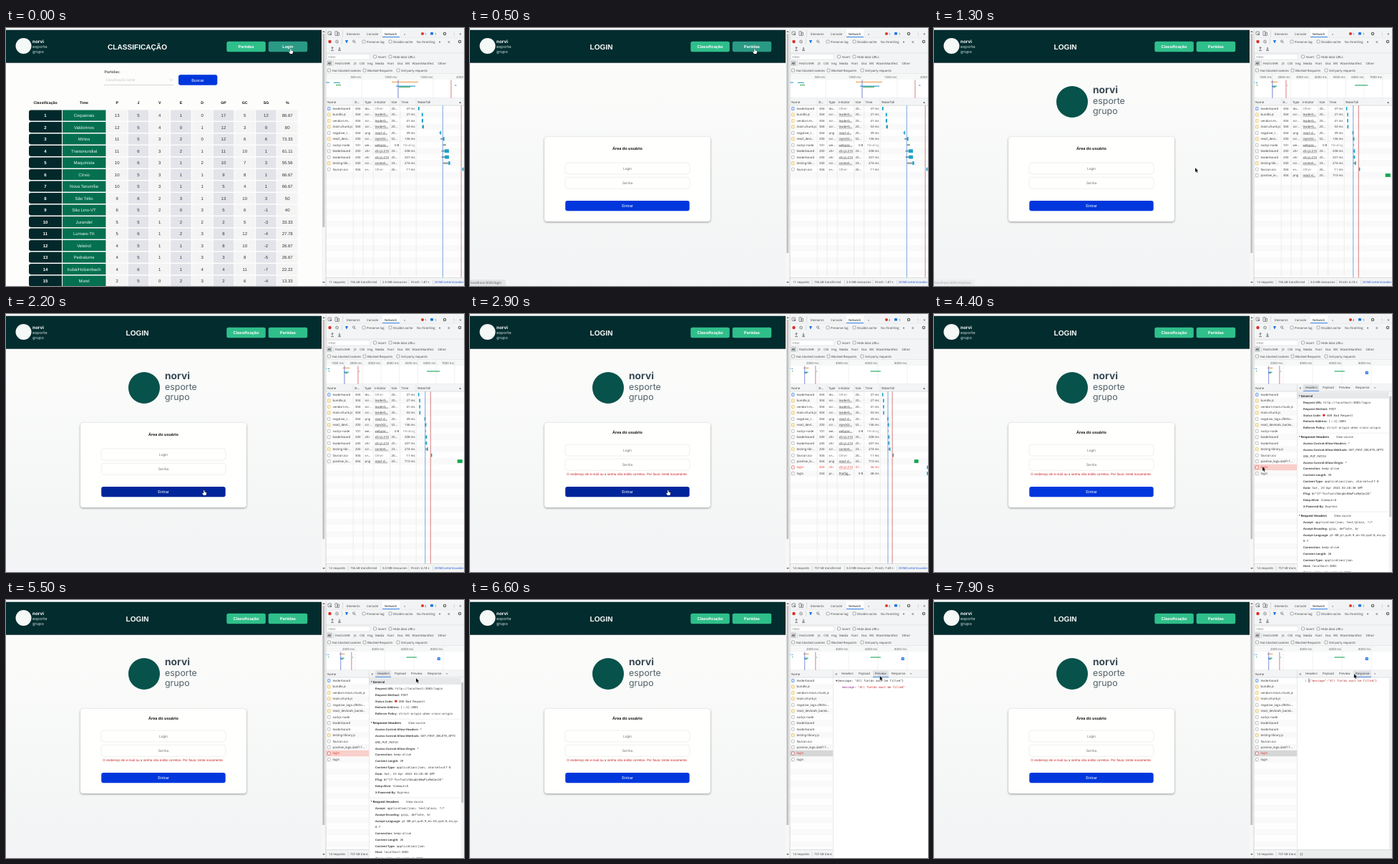
These frames come from a looping animation (640x360 px, 8000 ms). An HTML page with a canvas:

```html
<!DOCTYPE html>
<html lang="pt-BR">
<head>
<meta charset="utf-8">
<title>Login</title>
<style>
html, body { margin: 0; width: 100%; height: 100%; overflow: hidden; background: #fff; }
canvas { display: block; width: 640px; height: 360px; }
</style>
</head>
<body>
<canvas id="stage"></canvas>
<script>
const LOOP = 8000;
const canvas = document.getElementById('stage');
const dpr = window.devicePixelRatio || 1;
canvas.width = 640 * dpr;
canvas.height = 360 * dpr;
const c = canvas.getContext('2d');
c.scale(dpr, dpr);
c.textRendering = 'geometricPrecision';

const SANS = '"Liberation Sans", Arial, sans-serif';
const UI = '"Open Sans", "Noto Sans", sans-serif';
const MONO = '"DejaVu Sans Mono", monospace';
const ROW = 8.46;

// Moments at which the screen switches
const T = { status: 100, page: 400, pending: 600, hint: 700, logo: 1100, badge: 2500,
  error: 2700, open: 4100, preview: 6200, response: 7500 };

// Pointer tip: time, x, y
const PATH = [[0, 398, 29], [1050, 398, 29], [1300, 365, 195], [1700, 277, 246], [3100, 277, 246],
  [3600, 452, 219], [3800, 452, 219], [4000, 459, 213], [4500, 459, 213], [5100, 598, 106],
  [5500, 573, 109], [6000, 574, 103], [6500, 574, 103], [6900, 566, 122], [7250, 570, 118], [7450, 587, 103]];

const TEAMS = `Coqueirais 4 1 0 17 5|Valdorinos 4 0 1 12 3|Mirtos 3 2 0 12 6|Transmundial 3 2 1 11 10
Maquinista 3 1 2 10 7|Círvio 3 1 1 9 8|Nova Tarumília 3 1 1 5 4|São Télio 2 3 1 13 10|São Lino-VT 2 0 3 5 6
Jurandel 1 2 2 2 5|Lumare-TK 1 2 3 8 12|Veleirol 1 1 3 8 10|Pedralume 1 1 3 3 8|Irubá/Holzenbach 1 1 4 4 11
Morel 0 2 3 2 6`.split(/[|\n]/).map(line => {
  const [, name, nums] = line.match(/^(.*?) (\d.*)$/);
  const [v, e, d, gp, gc] = nums.split(' ').map(Number);
  const p = v * 3 + e, j = v + e + d;
  return [name, p, j, v, e, d, gp, gc, gp - gc, +(p / j / 3 * 100).toFixed(2)];
});

// short name, long name, status, type, initiator, size, time, wait start, start, end (ms)
const REQUESTS = `leaderboard;leaderboard;304;do...;Other;20...;37 ms;0;0;55
bundle.js;bundle.js;304;scr...;leaderb...;20...;27 ms;140;150;200
vendors-m...;vendors-main.chunk.js;304;scr...;leaderb...;20...;41 ms;140;150;210
main.chunk.js;main.chunk.js;304;scr...;leaderb...;20...;53 ms;150;175;235
negative_l...;negative_logo.2f805c...;304;png;react-d...;20...;39 ms;860;890;930
react_devt...;react_devtools_backe...;200;scr...;injectGl...;52...;136 ms;910;1000;1070
sockjs-node;sockjs-node;101;we...;webpac...;0 B;Pending;1000;1130;1130
leaderboard;leaderboard;200;xhr;xhr.js:210;20...;208 ms;950;1070;1250
leaderboard;leaderboard;200;xhr;xhr.js:210;20...;207 ms;950;1080;1250
testing-libr...;testing-library.js;200;scr...;content...;23...;274 ms;1020;1230;1300
favicon.ico;favicon.ico;304;x-i...;Other;26...;11 ms;1780;1800;1830
positive_lo...;positive_logo.4a6f17...;304;png;react-d...;20...;710 ms;5490;5490;6200
login;login;400;xhr;xhr.js:210;41...;46 ms;7640;7640;7690
login;login;204;pr...;Preflig...;0 B;48 ms;7640;7640;7690`.split('\n').map(l => l.split(';'));

const HEADERS = `#General
Request URL: http://localhost:3001/login
Request Method: POST
Status Code: @400 Bad Request
Remote Address: [::1]:3001
Referrer Policy: strict-origin-when-cross-origin
#Response Headers
Access-Control-Allow-Headers: *
Access-Control-Allow-Methods: GET,POST,DELETE,OPTI
 ONS,PUT,PATCH
Access-Control-Allow-Origin: *
Connection: keep-alive
Content-Length: 39
Content-Type: application/json; charset=utf-8
Date: Sat, 23 Apr 2022 02:28:30 GMT
ETag: W/"27-TvnfzuCcSbngbi6WwPiwRwGas2A"
Keep-Alive: timeout=5
X-Powered-By: Express
#Request Headers
Accept: application/json, text/plain, */*
Accept-Encoding: gzip, deflate, br
Accept-Language: pt-BR,pt;q=0.9,en-US;q=0.8,en;q=
 0.7
Connection: keep-alive
Content-Length: 26
Content-Type: application/json
Host: localhost:3001
Origin: http://localhost:3000`.split('\n');

function rect(x, y, w, h, fill) {
  c.fillStyle = fill;
  c.fillRect(x, y, w, h);
}
function round(x, y, w, h, r, fill, stroke) {
  c.beginPath();
  c.roundRect(x, y, w, h, r);
  if (fill) { c.fillStyle = fill; c.fill(); }
  if (stroke) { c.strokeStyle = stroke; c.lineWidth = .6; c.stroke(); }
}
function disc(x, y, r, fill) {
  c.beginPath();
  c.arc(x, y, r, 0, 7);
  c.fillStyle = fill;
  c.fill();
}
function line(x1, y1, x2, y2, color, w = .6) {
  c.beginPath();
  c.moveTo(x1, y1);
  c.lineTo(x2, y2);
  c.strokeStyle = color;
  c.lineWidth = w;
  c.stroke();
}
// y is the vertical middle of the line
function text(s, x, y, font, color, align = 'left') {
  c.font = font;
  c.fillStyle = color;
  c.textAlign = align;
  c.fillText(s, x, y + .36 * parseFloat(font.match(/[\d.]+px/)[0]));
}
const sans = (s, x, y, size, color, bold) =>
  text(s, x, y, `${bold ? 'bold ' : ''}${size}px ${SANS}`, color, 'center');
const ui = (s, x, y, color = '#3c3c3c', align) => text(s, x, y, `4.3px ${UI}`, color, align);
const mono = (s, x, y, color = '#333') => text(s, x, y, `4.05px ${MONO}`, color);
function labels(list, y) {
  for (const [s, x, color] of list) ui(s, x, y, color);
}
function check(s, x, y) {
  round(x, y - 2, 4, 4, .8, '#fff', '#777');
  ui(s, x + 6, y);
}

function pointer(t) {
  let i = PATH.findIndex(k => k[0] > t);
  if (i < 0) return PATH[PATH.length - 1].slice(1);
  const [t0, x0, y0] = PATH[i - 1], [t1, x1, y1] = PATH[i];
  const u = (t - t0) / (t1 - t0), e = u * u * (3 - 2 * u);
  return [x0 + (x1 - x0) * e, y0 + (y1 - y0) * e];
}

function drawCursor(x, y, hand) {
  c.save();
  c.translate(x, y);
  c.beginPath();
  const pts = hand
    ? [[-.8, 0], [.3, 0], [.5, 2.4], [3, 3], [3, 5], [2.2, 7], [-1, 7], [-2.8, 4.2], [-2, 3.6], [-.8, 4.5]]
    : [[0, 0], [0, 6], [1.4, 4.8], [2.3, 6.9], [3.3, 6.4], [2.4, 4.4], [4.2, 4.2]];
  pts.forEach(p => c.lineTo(...p));
  c.closePath();
  c.fillStyle = hand ? '#fff' : '#111';
  c.strokeStyle = hand ? '#111' : '#fff';
  c.lineWidth = .6;
  c.stroke();
  c.fill();
  c.restore();
}

function brand(x, y, size, gap, top, rest) {
  text('norvi', x, y, `bold ${size}px Inter, sans-serif`, top);
  text('esporte', x, y + gap, `${size * .9}px Inter, sans-serif`, rest);
  text('grupo', x, y + 2 * gap, `${size * .9}px Inter, sans-serif`, rest);
}

function header(title, buttons, hover) {
  rect(0, 2.7, 441, 46, '#022c2e');
  disc(24.5, 25, 11, '#f4f8f7');
  brand(37, 18.5, 6.3, 7.4, '#fff', '#d5e0df');
  sans(title, 183.5, 26.3, 10.1, '#fff', true);
  buttons.forEach((b, i) => {
    const x = 308.3 + i * 58.4;
    round(x, 18.8, 54.5, 14.4, 2.5, i === 1 && hover ? '#2a9a84' : '#2fbf8a');
    sans(b, x + 27.2, 26, 5.6, '#fff', true);
  });
}

function ranking() {
  rect(0, 48, 441, 312, '#fdfdfc');
  header('CLASSIFICAÇÃO', ['Partidas', 'Login'], true);
  text('Partidas:', 137.5, 61, `bold 5.2px ${SANS}`, '#555');
  text('Classificação Geral', 139, 72.5, `4.8px ${SANS}`, '#c4c4c4');
  line(137, 79.5, 234, 79.5, '#bbb');
  line(229, 71.5, 230.8, 73.3, '#aaa');
  line(230.8, 73.3, 232.6, 71.5, '#aaa');
  round(241, 65.2, 54.3, 14.6, 3, '#0037dc');
  sans('Buscar', 268, 72.5, 5.6, '#fff');
  const colX = i => 155.2 + (i - 1) * 29.75;
  sans('Classificação', 55, 104, 5.2, '#111', true);
  sans('Time', 109, 104, 5.2, '#111', true);
  'P J V E D GP GC SG %'.split(' ').forEach((h, i) => sans(h, colX(i + 1), 104, 5.2, '#111', true));
  TEAMS.forEach((row, n) => {
    const y = 114.5 + n * 16.5, mid = y + 7.4;
    round(32, y, 46, 15, [3, 0, 0, 3], '#03282b');
    sans(n + 1, 55, mid, 6, '#fff', true);
    rect(79, y, 60.5, 15, '#04704f');
    sans(row[0], 109, mid, 6, '#eaf5f0');
    for (let i = 1; i < 10; i++) {
      rect(colX(i) - 14.3, y, 28.6, 15, i % 2 ? '#f4f4f5' : '#e3e4e9');
      sans(row[i], colX(i), mid, 6, '#333');
    }
  });
}

function login(t, px, py) {
  const bg = c.createLinearGradient(0, 49, 0, 360);
  bg.addColorStop(0, '#fbfcfa');
  bg.addColorStop(1, '#f2f4f5');
  rect(0, 48, 441, 312, bg);
  header('LOGIN', ['Classificação', 'Partidas'], py < 34);
  if (t >= T.logo) {
    disc(193, 103, 22, '#07524a');
    brand(222, 86.5, 13.8, 14.6, '#394953', '#52616a');
  }
  c.save();
  c.shadowColor = 'rgba(0,0,0,.4)';
  c.shadowBlur = 3 * dpr;
  c.shadowOffsetY = dpr;
  round(104, 152, 232, 118, 4, '#fffffd');
  c.restore();
  const failed = t >= T.error, up = failed ? 6 : 0;
  sans('Área do usuário', 220, 168.3 - up / 2, 5.5, '#111', true);
  ['Login', 'Senha'].forEach((s, i) => {
    const y = 188 - up + i * 20.2;
    round(133, y, 174, 16, 4, '#fffffe', '#e2e2e0');
    sans(s, 220, y + 8, 5, '#777');
  });
  if (failed) {
    sans('O endereço de e-mail ou a senha não estão corretos. Por favor, tente novamente.',
      219.7, 223.3, 4.66, '#c8202a');
  }
  const over = px > 133 && px < 307 && py > 241 && py < 255;
  round(133.2, 240.9, 173.5, 14.4, 3, over ? '#00259a' : '#0037dc');
  sans('Entrar', 220, 248, 5.7, '#fff');
  return over;
}

function statusBubble(t) {
  const old = t >= T.status && t < T.hint;
  const alpha = old ? 1 : t >= T.hint ? Math.max(0, Math.min(1, (1400 - t) / 200)) : 0;
  if (!alpha) return;
  c.globalAlpha = alpha;
  round(0, 351, old ? 50 : 57, 9, [0, 2, 0, 0], '#e3e5e6');
  text(old ? 'localhost:3000/login' : 'localhost:3000/matches', 1, 355.7, `4.6px ${UI}`, '#555');
  c.globalAlpha = 1;
}

function scrollbar(t) {
  rect(441, 0, 6, 360, '#f7f7f7');
  rect(442.3, 8, 3, t < T.page ? 270 : 306, '#c2c2c2');
  for (const [y, d] of [[6, -2], [354, 2]]) {
    c.beginPath();
    c.moveTo(442, y);
    c.lineTo(446, y);
    c.lineTo(444, y + d);
    c.fillStyle = '#666';
    c.fill();
  }
}

function toolbars(t) {
  rect(447, 2, 193, 11, '#f1f3f4');
  rect(526, 2, 24, 11, '#fff');
  round(450, 5, 4.5, 4.5, .5, null, '#555');
  line(452, 7, 455, 10, '#555', .9);
  round(460, 4.5, 2.8, 6, .5, null, '#555');
  round(463.5, 6, 2, 4.5, .4, null, '#555');
  line(470.5, 3, 470.5, 12, '#ccc');
  labels([['Elements', 476], ['Console', 504], ['Network', 529, '#111'], ['»', 556]], 8);
  rect(526, 12, 24, 1, '#1a73e8');
  disc(582, 8, 2, '#e0332b');
  ui(t < T.badge ? '1' : '2', 585, 8, '#333');
  round(593, 6, 4, 3.5, .6, '#1a73e8');
  ui('1', 599, 8, '#333');
  ui('⋮', 624, 8);
  ui('✕', 633, 8);
  gear(613, 8);
  line(447, 13.3, 640, 13.3, '#d0d0d0');

  rect(447, 13.6, 193, 50.4, '#f3f4f5');
  disc(452.5, 19, 2.2, '#d93025');
  c.beginPath();
  c.arc(462.5, 19, 2, 0, 7);
  c.strokeStyle = '#666';
  c.stroke();
  line(461, 17.6, 464, 20.4, '#666');
  line(469.5, 15, 469.5, 23, '#ccc');
  c.beginPath();
  c.moveTo(474, 17);
  c.lineTo(478, 17);
  c.lineTo(476.4, 21);
  c.lineTo(475.6, 21);
  c.fillStyle = '#1a73e8';
  c.fill();
  c.beginPath();
  c.arc(486, 18.4, 1.5, 0, 7);
  c.strokeStyle = '#555';
  c.stroke();
  line(487, 19.5, 488.6, 21.2, '#555', .8);
  check('Preserve log', 498, 19);
  check('Disable cache', 535, 19);
  ui('No throttling', 574, 19);
  ui('▾', 605, 19);
  ui('≋', 617, 19);
  gear(634, 19);
  for (const [x, d] of [[456, -1], [466, 1]]) {
    line(x, 26.5, x, 30.5, '#555', .8);
    line(x - 1.5, 28.5 + d * .5, x, 28.5 + d * 2, '#555', .8);
    line(x + 1.5, 28.5 + d * .5, x, 28.5 + d * 2, '#555', .8);
    line(x - 2, 31.5, x + 2, 31.5, '#555', .7);
  }
  line(447, 34.8, 640, 34.8, '#d8d8d8');
  round(448.5, 36.5, 60, 7.5, .5, '#fff', '#dadada');
  ui('Filter', 450.5, 40.2, '#777');
  check('Invert', 513.5, 40);
  check('Hide data URLs', 535, 40);
  round(448.3, 45.5, 7.5, 7.5, 1, '#cfd1d4');
  labels([['All', 449.5, '#111'], ['Fetch/XHR', 460], ['JS', 486], ['CSS', 494], ['Img', 505], ['Media', 516],
    ['Font', 533], ['Doc', 547], ['WS', 558], ['Wasm', 567.5], ['Manifest', 580], ['Other', 603.5]], 49);
  line(457.8, 46, 457.8, 53, '#bbb');
  check('Has blocked cookies', 449.5, 59);
  check('Blocked Requests', 499, 59);
  check('3rd-party requests', 546, 59);
  line(447, 64, 640, 64, '#d0d0d0');
}
function gear(x, y) {
  c.beginPath();
  c.arc(x, y, 1.7, 0, 7);
  c.strokeStyle = '#666';
  c.lineWidth = 1.2;
  c.stroke();
}

function overview(t, net) {
  const x = ms => 447 + ms * net.scale;
  rect(447, 64.3, 193, 34, '#fff');
  rect(447, 64.3, 193, 8, '#f6f7f7');
  for (let ms = net.step; x(ms) < 652; ms += net.step) {
    line(x(ms), 64.5, x(ms), 98, '#e2e2e2', .5);
    ui(ms + ' ms', x(ms) - 1, 68.3, '#555', 'right');
  }
  const bar = (a, b, y, color) => rect(x(a), y, Math.max(1, (b - a) * net.scale), 1.1, color);
  bar(0, 50, 75.5, '#3b9fcf');
  bar(110, 200, 75.8, '#2b9fb5');
  bar(140, 210, 79, '#3aa757');
  bar(920, 1290, 74.8, '#e0a04a');
  bar(980, 1250, 80.6, '#1a9ac0');
  bar(1020, 1180, 81.8, '#3aa757');
  bar(1800, 1825, 79.5, '#3b9fcf');
  if (net.count > 11) bar(5490, t < T.logo ? 5900 : 6190, 79.4, '#17a65b');
  line(x(1010), 72.5, x(1010), 98, '#4a5fc4', .7);
  line(x(1750), 72.5, x(1750), 98, '#c8454a', .7);
  if (t >= T.open) {
    round(x(7600), 80, 4, 4, .6, '#1a73e8');
    rect(x(7600) + 1.5, 81.3, 1.2, 1.5, '#fff');
  }
  line(447, 98, 640, 98, '#ccc');
}

function requests(t, net, px, py) {
  const open = t >= T.open, right = open ? 507 : 640;
  const cols = [['St...', 487], ['Type', 501], ['Initiator', 515], ['Size', 538.5], ['Time', 552.5], ['Waterfall', 575]];
  rect(447, 98.3, 193, 251, '#fefefe');
  rect(447, 98.3, 193, 9.7, '#f3f4f5');
  for (let i = 1; i < 29; i += 2) rect(447, 108.2 + i * ROW, right - 447, ROW, '#f9f9f9');
  ui('Name', 449, 103, '#333');
  if (!open) {
    for (const [s, x] of cols) {
      ui(s, x, 103, '#333');
      line(x - 1.8, 98.5, x - 1.8, 348.5, '#dcdcdc', .5);
    }
    ui('▲', 632.5, 103, '#555');
  }
  line(447, 108, 640, 108, '#ccc');

  const shift = ms => 575.8 + ms * net.fall;
  for (let i = 0; i < net.count; i++) {
    const [short, long, status, type, from, size, time, wait, start, end] = REQUESTS[i];
    const top = 108.2 + i * ROW, y = top + ROW / 2, bad = status === '400';
    const busy = i === 11 && t < T.logo;
    const ink = bad ? '#e0332b' : '#333';
    if (open && bad) rect(447, top, 60, ROW, t < T.preview ? '#f9cfcb' : '#d6d6d6');
    else if (px > 447 && px < right && py > top && py < top + ROW) rect(447, top, right - 447, ROW, '#e9eff8');
    const js = /^scr/.test(type), doc = /^do/.test(type);
    round(449.5, y - 2, 3.6, 4.2, .5, js ? '#fff3cf' : doc ? '#cfe0fb' : '#fff',
      bad ? '#e0332b' : js ? '#e3b23c' : doc ? '#3f7de0' : '#999');
    ui(open ? long : short, 456.5, y, ink);
    if (open) continue;
    ui(busy ? '' : status, 488, y, ink);
    ui(type, 501.5, y, ink);
    ui(from, 515.5, y, from === 'Other' ? '#777' : ink);
    if (from !== 'Other') line(515.5, y + 2.3, 515.5 + c.measureText(from).width, y + 2.3, ink, .35);
    ui(busy ? '0 B' : size, size === '0 B' ? 543 : 538.5, y, ink);
    ui(busy ? 'Pending' : time, 571.5, y, /P/.test(time) || busy ? '#888' : ink, 'right');
    const a = shift(+wait), b = shift(+start), e = shift(+end);
    rect(a, y - 1, b - a, 2, '#8d9296');
    rect(b, y - 2.4, Math.max(+end > +start ? 1.6 : 0, e - b), 4.8, i === 11 ? '#13a851' : '#1aa3c9');
  }
  if (!open) {
    line(shift(1000), 108, shift(1000), 348.5, '#5b8fd8', .8);
    line(shift(1750), 108, shift(1750), 348.5, '#d0605f', .8);
  }
  rect(447, 348.5, 193, 11.5, '#f3f4f5');
  line(447, 348.5, 640, 348.5, '#ccc');
  c.save();
  c.beginPath();
  c.rect(447, 349, right - 448, 11);
  c.clip();
  labels([[net.count + ' requests', 451], [net.kb + ' kB transferred', 481], [net.mb + ' MB resources', 526],
    ['Finish: ' + net.finish + ' s', 566], ['DOMContentLoaded', 599, '#1a4fc4']], 354.3);
  for (const x of [478, 523.5, 563, 596.5]) line(x, 351, x, 358, '#ccc');
  c.restore();
}

function details(t) {
  const tab = t >= T.response ? 3 : t >= T.preview ? 2 : 0;
  c.save();
  c.beginPath();
  c.rect(507, 98.3, 133, 262);
  c.clip();
  rect(507, 98.3, 133, 262, '#fff');
  rect(507, 98.3, 133, 9.7, '#f3f4f5');
  ui('✕', 510, 103);
  const tabs = [['Headers', 519], ['Payload', 543], ['Preview', 566], ['Response', 589], ['»', 615]];
  const [, tx] = tabs[tab], tw = tab === 3 ? 25 : 22;
  rect(tx - 3, 98.3, tw, 9.7, '#dfe2e6');
  rect(tx - 3, 107, tw, 1, '#1a73e8');
  labels(tabs, 102.7);
  line(507, 108, 640, 108, '#ccc');
  if (tab === 0) headerList();
  if (tab === 2) {
    mono('▼{message: "All fields must be filled"}', 511, 113);
    mono('message:', 520, 121.5, '#8a1a8f');
    mono('"All fields must be filled"', 542, 121.5, '#c41a16');
  }
  if (tab === 3) {
    mono('1', 518, 112.5, '#888');
    mono('{"message":"All fields must be filled"}', 524, 112.5, '#b8302c');
    line(523.8, 109.5, 523.8, 115, '#111');
    rect(636, 108.3, 4, 240, '#eeeeee');
    rect(507, 348.5, 133, 11.5, '#ebecec');
    line(507, 348.5, 640, 348.5, '#ccc');
    mono('{}', 511, 354.3);
  }
  line(507, 98.3, 507, 360, '#bbb');
  c.restore();
}

function headerList() {
  let y = 105.3;
  HEADERS.forEach((s, i) => {
    if (s[0] === '#') {
      y += i ? 12.4 : 8.8;
      if (i) line(507, y - 5, 635, y - 5, '#ddd', .5);
      else rect(507, 109, 129, 9, '#e6e8ea');
      text('▼', 509, y, `3.2px ${UI}`, '#555');
      text(s.slice(1), 512.5, y, `bold 4.3px ${UI}`, '#333');
      if (i) ui('View source', i < 10 ? 562 : 559, y);
      y += .8;
      return;
    }
    y += 8.78;
    if (s[0] === ' ') return mono(s.slice(1), 516, y);
    const cut = s.indexOf(': ') + 1;
    text(s.slice(0, cut), 516, y, `bold 4px ${UI}`, '#444');
    let x = 518 + c.measureText(s.slice(0, cut)).width, value = s.slice(cut + 1);
    if (value[0] === '@') {
      disc(x + 2, y, 1.8, '#e0332b');
      x += 6;
      value = value.slice(1);
    }
    mono(value, x, y);
  });
  rect(635.5, 108.3, 4.5, 252, '#f5f5f5');
  rect(636.3, 115, 2.8, 168, '#c4c4c4');
}

function network(t) {
  if (t < T.pending) return { count: 11, scale: .1, fall: .0345, step: 500, kb: 756, mb: '2.9', finish: '1.87' };
  if (t < T.error) return { count: 12, scale: .0257, fall: .01, step: 1000, kb: 756, mb: '3.0', finish: '6.18' };
  return { count: 14, scale: .0205, fall: .0082, step: 2000, kb: 757, mb: '3.0', finish: '7.69' };
}

function draw(t) {
  const [x, y] = pointer(t), net = network(t);
  rect(0, 0, 640, 360, '#fff');
  let hand = y < 34;
  if (t < T.page) ranking();
  else hand = login(t, x, y) || hand;
  statusBubble(t);
  scrollbar(t);
  toolbars(t);
  overview(t, net);
  requests(t, net, x, y);
  if (t >= T.open) details(t);
  rect(0, 0, 640, 2, '#f8f8f8');
  line(447, 2, 447, 360, '#bdbdbd');
  drawCursor(x, y, hand);
}

const begin = performance.now();
function tick() {
  draw((performance.now() - begin) % LOOP);
  requestAnimationFrame(tick);
}
tick();
</script>
</body>
</html>
```
